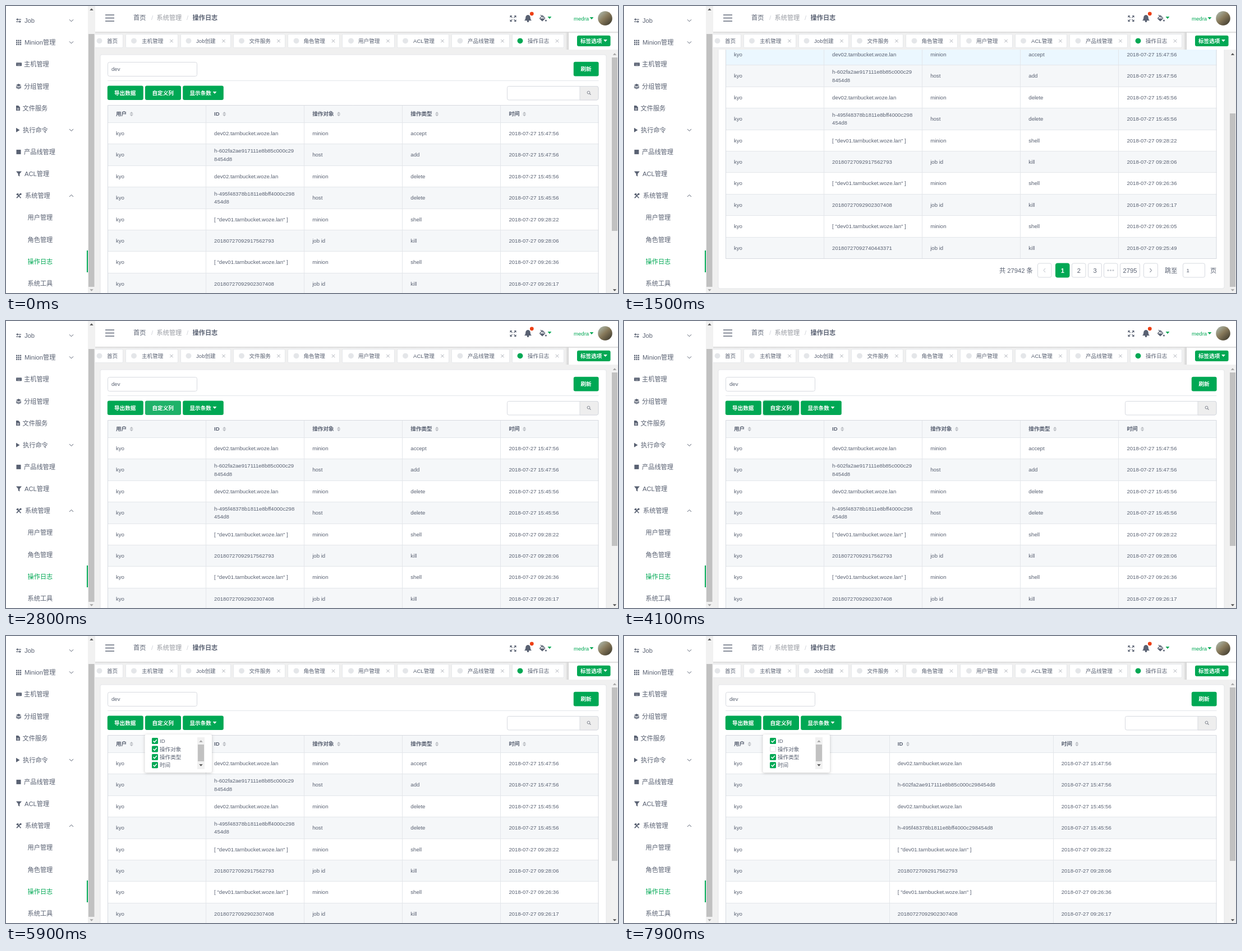
Recreate the animation shown at these times as an HTML page with a canvas. Size 1091 by 513 pixels, loop 8000 ms.

```html
<!DOCTYPE html>
<html lang="zh-CN">
<head>
<meta charset="utf-8">
<title>操作日志</title>
<style>
html, body { margin: 0; width: 100%; height: 100%; overflow: hidden; background: #fff; }
canvas { display: block; width: 1091px; height: 513px; }
</style>
</head>
<body>
<canvas id="stage"></canvas>
<script>
const W = 1091, H = 513, LOOP = 8000;
const GREEN = '#00a854', INK = '#596172', LINE = '#e3e6ea', EDGE = '#d7dae0', BACK = '#f0f0f0';
const FONT = '"Liberation Sans", "Noto Sans CJK SC", "Noto Sans CJK", sans-serif';
const canvas = document.getElementById('stage');
const ctx = canvas.getContext('2d');
const ratio = window.devicePixelRatio || 1;
canvas.width = W * ratio;
canvas.height = H * ratio;

// Value of the last step that has started; steps are [time, value].
function stepAt(t, steps) {
  let value = steps[0][1];
  for (const [start, v] of steps) if (t >= start) value = v;
  return value;
}

function rect(x, y, w, h, color) {
  ctx.fillStyle = color;
  ctx.fillRect(x, y, w, h);
}

function box(x, y, w, h, r, fill, stroke) {
  ctx.beginPath();
  if (stroke) ctx.roundRect(x + .5, y + .5, w - 1, h - 1, r);
  else ctx.roundRect(x, y, w, h, r);
  if (fill) { ctx.fillStyle = fill; ctx.fill(); }
  if (stroke) { ctx.strokeStyle = stroke; ctx.lineWidth = 1; ctx.stroke(); }
}

function setFont(size, bold) {
  ctx.font = (bold ? 'bold ' : '') + size + 'px ' + FONT;
}

// Text centred vertically on y, with its baseline on a whole pixel.
function text(s, x, y, size = 9.6, color = INK, bold = false, align = 'left') {
  setFont(size, bold);
  ctx.textAlign = align;
  ctx.fillStyle = color;
  ctx.fillText(s, x, Math.round(y + size * .37));
}

function disc(x, y, r, color) {
  ctx.beginPath();
  ctx.arc(x, y, r, 0, Math.PI * 2);
  ctx.fillStyle = color;
  ctx.fill();
}

function poly(color, ...p) {
  ctx.beginPath();
  for (let i = 0; i < p.length; i += 2) ctx.lineTo(p[i], p[i + 1]);
  ctx.closePath();
  ctx.fillStyle = color;
  ctx.fill();
}

function stroke(color, width, ...p) {
  ctx.beginPath();
  for (let i = 0; i < p.length; i += 2) ctx.lineTo(p[i], p[i + 1]);
  ctx.strokeStyle = color;
  ctx.lineWidth = width;
  ctx.stroke();
}

// Triangle centred on x, y; dir 1 points down, -1 up.
function caret(x, y, color, dir = 1, half = 3.4, h = 4) {
  poly(color, x - half, y - dir * h / 2, x + half, y - dir * h / 2, x, y + dir * h / 2);
}

function chevron(x, y, dir, color = INK) {
  stroke(color, 1, x - 3.5, y - dir * 1.8, x, y + dir * 1.8, x + 3.5, y - dir * 1.8);
}

function button(label, x, y, w, h, tx, color = GREEN) {
  box(x, y, w, h, 3, color);
  text(label, tx, y + h / 2, 9.6, '#fff', true);
}

const menuIcons = {
  swap(y) {
    stroke(INK, 1.2, 20, y - 2, 27, y - 2);
    stroke(INK, 1.2, 18, y + 2, 25, y + 2);
    poly(INK, 18, y - 2, 21, y - 4.3, 21, y + .2);
    poly(INK, 27, y + 2, 24, y - .2, 24, y + 4.3);
  },
  grid(y) {
    for (let i = 0; i < 9; i++) rect(18 + i % 3 * 3.4, y - 4.5 + Math.floor(i / 3) * 3.4, 2.3, 2.3, INK);
  },
  host(y) {
    box(18, y - 3, 10, 6, .8, INK);
    for (let i = 0; i < 4; i++) rect(19.3 + i * 2, y - 1.6, .8, 1, '#b9bdc6');
    rect(20.5, y + .8, 5, .8, '#b9bdc6');
  },
  layers(y) {
    poly(INK, 18, y - 2, 22.5, y - 4.5, 27, y - 2, 22.5, y + .4);
    stroke(INK, 1.2, 18, y + .2, 22.5, y + 2.4, 27, y + .2);
    stroke(INK, 1.2, 18, y + 2.2, 22.5, y + 4.4, 27, y + 2.2);
  },
  file(y) {
    poly(INK, 18, y - 4.5, 22, y - 4.5, 25, y - 1.5, 25, y + 4.5, 18, y + 4.5);
    rect(19.5, y, 4, .9, '#fff');
    rect(19.5, y + 2, 4, .9, '#fff');
  },
  play(y) { poly(INK, 18, y - 4, 24.5, y, 18, y + 4); },
  block(y) { rect(18.5, y - 4, 8, 8, INK); },
  funnel(y) {
    poly(INK, 18, y - 4.5, 28, y - 4.5, 24.3, y, 24.3, y + 4.6, 21.7, y + 3, 21.7, y);
  },
  tools(y) {
    stroke(INK, 1.8, 19, y + 4, 26, y - 3.5);
    stroke(INK, 1.6, 20, y - 3, 26.5, y + 4);
    poly(INK, 18, y - 2.5, 21, y - 4.8, 23, y - 3, 20, y - .8);
    disc(26, y - 3, 1.7, INK);
  }
};

const menu = [
  ['swap', 'Job', 33, 1], ['grid', 'Minion管理', 33, 1], ['host', '主机管理', 32], ['layers', '分组管理', 32],
  ['file', '文件服务', 29.5], ['play', '执行命令', 30, 1], ['block', '产品线管理', 32], ['funnel', 'ACL管理', 33],
  ['tools', '系统管理', 34, -1], ['', '用户管理', 38.5], ['', '角色管理', 38.5], ['', '操作日志', 38.5], ['', '系统工具', 38.5]
];

function sidebar() {
  rect(0, 0, 146, H, '#fff');
  menu.forEach(([icon, label, x, arrow], i) => {
    const y = 26 + i * 39.15, active = label === '操作日志';
    if (icon) menuIcons[icon](y);
    text(label, x, y, 11.2, active ? GREEN : INK);
    if (arrow) chevron(116.5, y, arrow);
  });
  rect(146, 0, 13, H, '#f1f1f1');
  rect(144, 437, 2, 39, GREEN);
  rect(147, 50, 10.5, 452, '#c1c1c1');
  caret(152.5, 6, '#505050', -1, 3.2, 3.5);
  caret(152.5, 508, '#a3a3a3', 1, 3.2, 3.5);
}

function header() {
  rect(159, 0, W - 159, 46, '#fff');
  const shade = ctx.createLinearGradient(0, 45.5, 0, 49.5);
  shade.addColorStop(0, '#d3d3d3');
  shade.addColorStop(1, 'rgba(225,225,225,0)');
  rect(159, 46, W - 159, 4, shade);
  for (const y of [16, 21.5, 27]) rect(177, y - .7, 16, 1.4, INK);
  text('首页', 227, 21, 11.2);
  text('/', 259, 21, 11.2, '#cfd2d8');
  text('系统管理', 268.5, 21, 11.2, '#979aa1');
  text('/', 322, 21, 11.2, '#cfd2d8');
  text('操作日志', 332.5, 21, 11.2, INK, true);

  // expand arrows
  for (const sx of [-1, 1]) for (const sy of [-1, 1]) {
    const cx = 904 + sx * 5.5, cy = 22.5 + sy * 5.5;
    poly(INK, cx, cy, cx - sx * 4, cy, cx, cy - sy * 4);
    stroke(INK, 1.2, cx - sx, cy - sy, cx - sx * 4.2, cy - sy * 4.2);
  }
  // bell
  ctx.beginPath();
  ctx.moveTo(924, 26);
  ctx.quadraticCurveTo(926.3, 24, 926.3, 20.5);
  ctx.bezierCurveTo(926.3, 14.5, 934.7, 14.5, 934.7, 20.5);
  ctx.quadraticCurveTo(934.7, 24, 937, 26);
  ctx.closePath();
  ctx.fillStyle = INK;
  ctx.fill();
  disc(930.5, 27, 1.9, INK);
  disc(937.3, 13.8, 3.4, '#ed3f14');
  // bucket
  stroke(INK, 1.2, 953, 16, 958, 21);
  stroke(INK, 1.2, 951.5, 22, 956.5, 17.2, 961, 22);
  poly(INK, 950.5, 22.2, 961.5, 22.2, 956, 27.6);
  disc(962.5, 26, 1.5, INK);
  caret(969, 21, GREEN);

  text('medra', 1012, 22.5, 9.6, GREEN);
  caret(1044, 22, GREEN);
  const fur = ctx.createLinearGradient(1058, 12, 1078, 34);
  fur.addColorStop(0, '#a9b2a4');
  fur.addColorStop(.45, '#87795a');
  fur.addColorStop(1, '#3e3a2e');
  disc(1068, 22, 12.8, fur);
}

// label, left, right, dot x, label x, close x
const tabs = [
  ['首页', 155, 209, 166.5, 180], ['主机管理', 213, 307, 228, 242, 295], ['Job创建', 311, 401, 325.5, 339, 388],
  ['文件服务', 405, 498, 420, 433.5, 486], ['角色管理', 502, 595, 517.5, 530.5, 583.5],
  ['用户管理', 599, 693, 615, 628, 681], ['ACL管理', 697, 790, 712, 726, 778],
  ['产品线管理', 794, 898, 809.5, 823, 885], ['操作日志', 902, 995, 916.5, 930, 982.5]
];

function tabBar() {
  rect(159, 47, W - 159, 31, BACK);
  ctx.save();
  ctx.beginPath();
  ctx.rect(159, 47, 844, 31);
  ctx.clip();
  tabs.forEach(([label, x1, x2, dot, tx, close], i) => {
    box(x1, 50, x2 - x1, 25, 2, '#fff', '#e6e8eb');
    disc(dot, 62.3, 4.9, i === tabs.length - 1 ? GREEN : '#e4e6e9');
    text(label, tx, 62.5);
    if (close) {
      stroke('#a0a4ad', .9, close - 2.7, 59.8, close + 2.7, 65.2);
      stroke('#a0a4ad', .9, close - 2.7, 65.2, close + 2.7, 59.8);
    }
  });
  const shade = ctx.createLinearGradient(997, 0, 1003, 0);
  shade.addColorStop(0, 'rgba(0,0,0,0)');
  shade.addColorStop(1, 'rgba(0,0,0,.12)');
  rect(997, 47, 6, 31, shade);
  ctx.restore();
  rect(1003, 47, 88, 31, '#fff');
  button('标签选项', 1018, 52.8, 59.6, 19.2, 1024);
  caret(1068.5, 62, '#fff');
}

const host2 = 'dev02.tarnbucket.woze.lan', host1 = '[ "dev01.tarnbucket.woze.lan" ]';
const USER = 'kyo', DAY = '2018-07-27 ';
const titles = ['用户', 'ID', '操作对象', '操作类型', '时间'];
const rows = [
  [host2, 'minion', 'accept', '15:47:56'],
  ['h-602fa2ae917111e8b85c000c298454d8', 'host', 'add', '15:47:56'],
  [host2, 'minion', 'delete', '15:45:56'],
  ['h-495f48378b1811e8bff4000c298454d8', 'host', 'delete', '15:45:56'],
  [host1, 'minion', 'shell', '09:28:22'],
  ['20180727092917562793', 'job id', 'kill', '09:28:06'],
  [host1, 'minion', 'shell', '09:26:36'],
  ['20180727092902307408', 'job id', 'kill', '09:26:17'],
  [host1, 'minion', 'shell', '09:26:05'],
  ['20180727092740443371', 'job id', 'kill', '09:25:49']
].map(([id, target, kind, time]) => [USER, id, target, kind, DAY + time]);

function wrap(s, width) {
  setFont(9.6);
  let n = s.length;
  while (n > 1 && ctx.measureText(s.slice(0, n)).width > width) n--;
  return n < s.length ? [s.slice(0, n), s.slice(n)] : [s];
}

function table(cols, hover) {
  const x0 = 181, width = 875.5, top = 177, body = 209, rowH = 38.4;
  const colW = width / cols.length, bottom = body + rowH * rows.length;
  rect(x0, top, width, body - top, '#f5f7f9');
  rows.forEach((row, i) => {
    const y = Math.round(body + i * rowH), end = Math.round(body + (i + 1) * rowH);
    rect(x0, y, width, end - y, i === 0 && hover ? '#ebf7ff' : i % 2 ? '#f5f7f9' : '#fff');
    rect(x0, end - 1, width, 1, LINE);
    cols.forEach((c, k) => {
      const lines = wrap(row[c], colW - 29.6);
      lines.forEach((line, n) => {
        text(line, x0 + k * colW + 15, body + (i + .5) * rowH - .7 + (n - (lines.length - 1) / 2) * 14.4);
      });
    });
  });
  cols.forEach((c, k) => {
    const x = x0 + k * colW + 15;
    text(titles[c], x, 192.8, 9.6, INK, true);
    const sx = x + ctx.measureText(titles[c]).width + 8.5;
    caret(sx, 190.7, '#bbbec4', -1, 3.2, 3.5);
    caret(sx, 195.5, '#bbbec4', 1, 3.2, 3.5);
    if (k) rect(Math.round(x0 + k * colW), top, 1, bottom - top, LINE);
  });
  rect(x0, body - 1, width, 1, LINE);
  box(x0, top, width, bottom - top, 0, null, EDGE);
}

function pager() {
  const y = 613.5;
  const cell = (x, w, label, on) => {
    box(x, y - 13, w, 26, 3, on ? GREEN : '#fff', on ? GREEN : EDGE);
    text(label, x + w / 2, y, 11.2, on ? '#fff' : INK, on, 'center');
  };
  text('共 27942 条', 669, y, 11.2);
  cell(737, 25.5, '');
  stroke('#b9bdc6', 1, 751, y - 3.5, 748, y, 751, y + 3.5);
  cell(769, 25.5, '1', true);
  cell(798, 25.5, '2');
  cell(827, 25, '3');
  cell(855, 25.5, '');
  for (const x of [863, 867.5, 872]) disc(x, y, 1.6, '#c5c8ce');
  cell(884, 36, '2795');
  cell(926, 26, '');
  stroke(INK, 1, 937.5, y - 3.5, 940.5, y, 937.5, y + 3.5);
  text('跳至', 964, y, 11.2);
  box(996, y - 13, 40, 26, 3, '#fff', EDGE);
  text('1', 1002.5, y, 9.6);
  text('页', 1045, y, 11.2);
}

function popup(t) {
  const show = stepAt(t, [[0, 0], [4300, .35], [4400, .8], [4500, 1]]);
  if (!show) return;
  ctx.save();
  ctx.globalAlpha = show;
  ctx.translate(0, 176);
  ctx.scale(1, .8 + .2 * show);
  ctx.translate(0, -176);
  ctx.shadowColor = 'rgba(0,0,0,.22)';
  ctx.shadowBlur = 5 * ratio;
  ctx.shadowOffsetY = ratio;
  box(247.5, 176, 119.5, 68, 3, '#fff');
  ctx.shadowColor = 'transparent';

  const off = stepAt(t, [[0, 0], [6200, .6], [6300, 1]]);
  const rim = stepAt(t, [[0, '#bcbcbc'], [7100, '#ccced2'], [7200, '#dddee1']]);
  titles.slice(1).forEach((label, i) => {
    const y = 187.6 + i * 14.4, fade = i === 1 ? off : 0;
    box(260, y - 5.5, 11, 11, 1.5, '#fff', rim);
    ctx.globalAlpha = show * (1 - fade);
    box(260, y - 5.5, 11, 11, 1.5, GREEN);
    stroke('#fff', 1.5, 262.5, y, 264.8, y + 2.3, 268.8, y - 2.3);
    ctx.globalAlpha = show;
    text(label, 274, y);
  });
  rect(341, 181, 13, 57, '#f1f1f1');
  rect(342, 194, 11, 30, '#c1c1c1');
  caret(347.5, 188, '#a3a3a3', -1, 3.2, 3.5);
  caret(347.5, 231, '#505050', 1, 3.2, 3.5);
  ctx.restore();
}

function toolbar(t) {
  const y = 142.4, h = 25.6;
  box(181, 100, 160, 26, 3, '#fff', EDGE);
  text('dev', 188, 112.8);
  button('刷新', 1011.8, 99.8, 44.8, h, 1024.5);
  rect(181, 133, 875.5, 1, LINE);
  button('导出数据', 180.8, y, 64, h, 193);
  if (t >= 4100 && t < 5900) box(246.4, y - 1.6, 67.2, h + 3.2, 4.5, 'rgba(0,168,84,.2)');
  const color = stepAt(t, [
    [0, GREEN], [2800, '#1fb269'], [2900, '#33b976'], [4100, '#00a050'],
    [4300, '#1aac63'], [4400, '#33b976'], [4800, '#14af62'], [4900, GREEN]
  ]);
  button('自定义列', 248, y, 64, h, 260.5, color);
  button('显示条数', 315.2, y, 72.6, h, 327.5);
  caret(372, 155, '#fff');
  box(893, 143, 163.5, 25.5, 3, '#fff', EDGE);
  box(1022.5, 143, 34, 25.5, [0, 3, 3, 0], '#eee', EDGE);
  ctx.beginPath();
  ctx.arc(1038.5, 154.7, 2.4, 0, Math.PI * 2);
  ctx.strokeStyle = '#80858f';
  ctx.lineWidth = 1;
  ctx.stroke();
  stroke('#80858f', 1.2, 1040.3, 156.5, 1042.5, 158.7);
}

function content(t) {
  const scroll = stepAt(t, [[0, 0], [1300, 63.6], [1400, 118], [1500, 140.6], [2200, 62], [2300, 0]]);
  const cols = stepAt(t, [[0, [0, 1, 2, 3, 4]], [6100, [0, 1, 3, 4]], [7900, [0, 1, 4]]]);
  rect(159, 78, W - 159, H - 78, BACK);
  ctx.save();
  ctx.beginPath();
  ctx.rect(159, 78, 919, H - 78);
  ctx.clip();
  ctx.translate(0, -Math.round(scroll));
  box(167.5, 86.5, 903, 560, 3, '#fff', '#e4e5e8');
  toolbar(t);
  table(cols, t >= 1300 && t < 2600);
  pager();
  popup(t);
  ctx.restore();

  rect(1079, 79, 12, H - 79, '#f1f1f1');
  rect(1080, Math.round(92 + scroll * .71), 10, 310, '#c1c1c1');
  caret(1085, 86, scroll ? '#505050' : '#a3a3a3', -1, 3.2, 3.5);
  caret(1085, 508, scroll > 140 ? '#a3a3a3' : '#505050', 1, 3.2, 3.5);
}

const begin = performance.now();

function frame(now) {
  const t = Math.max(0, now - begin) % LOOP;
  ctx.setTransform(ratio, 0, 0, ratio, 0, 0);
  content(t);
  tabBar();
  header();
  sidebar();
  requestAnimationFrame(frame);
}

frame(begin);
</script>
</body>
</html>
```
